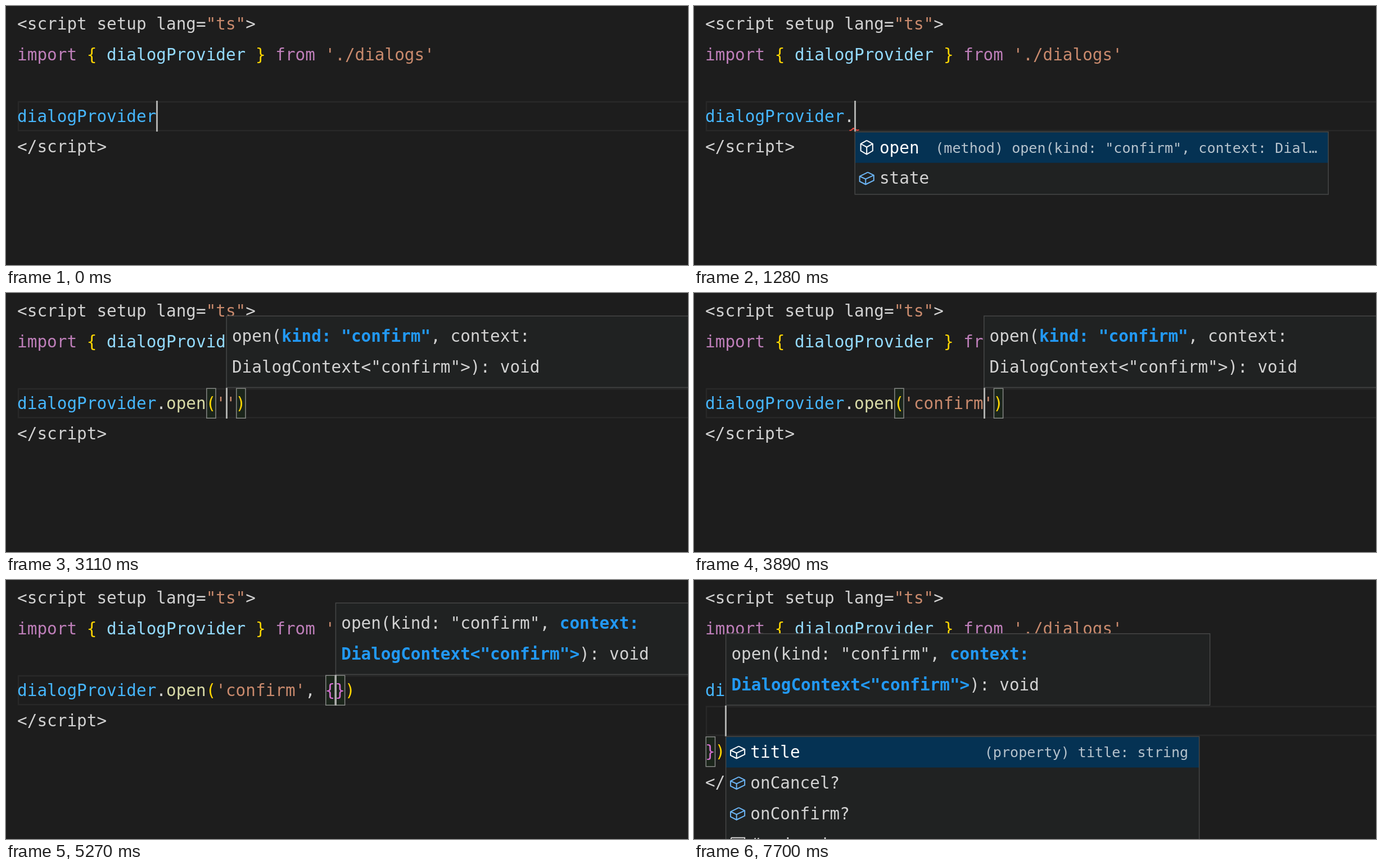
Write an HTML page with a canvas that moves like this. It is 1213 by 462 pixels and loops after 8000 ms.

```html
<!DOCTYPE html>
<html lang="en">
<head>
<meta charset="utf-8">
<title>Typed dialogs in an editor</title>
<style>
  html, body { margin: 0; width: 100%; height: 100%; overflow: hidden; background: #1d1d1d; }
  canvas { display: block; }
</style>
</head>
<body>
<canvas id="stage" width="1213" height="462"></canvas>
<script>
const ctx = document.getElementById('stage').getContext('2d');
const WIDTH = 1213, HEIGHT = 462, LOOP = 8000;
const LEFT = 20.1, ADVANCE = 17.66, FONT_SIZE = 29.33;
const FIRST_TOP = 5, LINE_HEIGHT = 54.75, BASELINE = 37.4;
const DETAIL_SCALE = 0.855;

const color = {
  back: '#1d1d1d', panel: '#202222', edge: '#464747', rule: '#282828',
  text: '#d2d2d2', keyword: '#bf7fba', string: '#c98a6d', gold: '#ffd602',
  pink: '#d670d3', name: '#94dbfe', constant: '#46b7ff', method: '#d9dba8',
  active: '#2299f5', blame: '#454545', caret: '#aeafad', error: '#e8483f',
  wordRead: '#474747', wordWrite: '#063654', selected: '#053253',
  field: '#6cb5f5', methodIcon: '#b180d7', white: '#ffffff'
};

const colX = col => LEFT + col * ADVANCE;
const lineTop = row => FIRST_TOP + row * LINE_HEIGHT;

// Code pieces
const OBJECT = ['dialogProvider', color.constant];
const DOT = ['.', color.text];
const OPEN = ['open', color.method];
const END = [['<\/script>', color.text]];
const paren = (...inner) => [OBJECT, DOT, OPEN, ['(', color.gold], ...inner, [')', color.gold]];
const quoted = word => [`'${word}'`, color.string];
const HEAD = [
  [['<' + 'script setup lang=', color.text], ['"ts"', color.string], ['>', color.text]],
  [['import ', color.keyword], ['{', color.gold], [' dialogProvider ', color.name],
   ['}', color.gold], [' from ', color.keyword], ["'./dialogs'", color.string]],
  []
];

const memberList = {
  col: 15, row: 4,
  items: [
    { label: 'open', icon: 'method', detail: '(method) open(kind: "confirm", context: Dial…' },
    { label: 'state', icon: 'field' }
  ]
};
const kindList = { col: 21, row: 4, items: [{ label: 'confirm', icon: 'box' }] };
const propertyList = detail => ({
  col: 2, row: 5,
  items: [
    { label: 'title', icon: 'field', detail },
    { label: 'onCancel?', icon: 'field' },
    { label: 'onConfirm?', icon: 'field' },
    { label: '#endregion', icon: 'box', detail: 'Folding Region End' }
  ]
});

// Each step overrides part of the state that came before it.
const steps = [
  [0, { code: [[OBJECT], END], col: 14, row: 3, caret: true, words: false, squiggle: 0,
        brackets: [], hint: null, list: null }],
  [120, { words: true }],
  [420, { caret: false }],
  [810, { caret: true }],
  [1130, { code: [[OBJECT, DOT], END], col: 15, words: false, list: memberList }],
  [1280, { squiggle: 15 }],
  [1530, { caret: false }],
  [2100, { code: [[OBJECT, DOT, ['open', color.name]], END], col: 19, caret: true,
           squiggle: 19, list: null }],
  [2340, { squiggle: 0 }],
  [2500, { code: [paren(), END], col: 20, brackets: [[19, 3], [20, 3]] }],
  [2670, { hint: { col: 20, row: 3, arg: 0 } }],
  [3040, { code: [paren(quoted('')), END], col: 21, brackets: [[19, 3], [22, 3]] }],
  [3110, { hint: { col: 21, row: 3, arg: 0 } }],
  [3190, { list: kindList }],
  [3640, { caret: false }],
  [3890, { code: [paren(quoted('confirm')), END], col: 28, caret: true, list: null,
           brackets: [[19, 3], [29, 3]], hint: { col: 28, row: 3, arg: 0 } }],
  [4300, { col: 29, hint: { col: 29, row: 3, arg: 0 } }],
  [4630, { code: [paren(quoted('confirm'), [',', color.text]), END], col: 30,
           brackets: [[19, 3], [30, 3]] }],
  [4710, { hint: { col: 30, row: 3, arg: 1 } }],
  [4870, { code: [paren(quoted('confirm'), [', ', color.text]), END], col: 31,
           brackets: [[19, 3], [31, 3]], hint: { col: 31, row: 3, arg: 1 } }],
  [5110, { code: [paren(quoted('confirm'), [', ', color.text], ['{}', color.pink]), END], col: 32,
           brackets: [[19, 3], [33, 3]], hint: { col: 32, row: 3, arg: 1 } }],
  [5270, { brackets: [[31, 3], [32, 3]] }],
  [5680, { code: [
             [...paren(quoted('confirm'), [', ', color.text]).slice(0, -1), ['{', color.pink]],
             [], [['}', color.pink], [')', color.gold]], END],
           col: 2, row: 4, brackets: [[31, 3], [0, 5]],
           hint: { col: 2, row: 4, arg: 1 } }],
  [6090, { caret: false }],
  [6660, { caret: true, list: propertyList('') }],
  [6740, { list: propertyList('(property) title: string') }],
  [7150, { caret: false }],
  [7700, { caret: true }]
];

function stateAt(time) {
  return Object.assign({}, ...steps.filter(([start]) => start <= time).map(([, change]) => change));
}

function fill(x, y, w, h, style) {
  ctx.fillStyle = style;
  ctx.fillRect(x, y, w, h);
}

function frame(x, y, w, h, style, width = 1.5) {
  ctx.strokeStyle = style;
  ctx.lineWidth = width;
  ctx.strokeRect(x, y, w, h);
}

function polyline(points, style, width) {
  ctx.beginPath();
  points.forEach(([x, y]) => ctx.lineTo(x, y));
  ctx.strokeStyle = style;
  ctx.lineWidth = width;
  ctx.stroke();
}

// Sets text on the monospace grid and returns the x after it.
function write(text, x, y, style, { bold = false, scale = 1 } = {}) {
  ctx.font = `${bold ? 'bold ' : ''}${FONT_SIZE * scale}px "DejaVu Sans Mono", monospace`;
  ctx.fillStyle = style;
  for (const char of text) {
    if (char !== ' ') ctx.fillText(char, x, y);
    x += ADVANCE * scale;
  }
  return x;
}

function drawLine(tokens, row) {
  let x = LEFT;
  for (const [text, style] of tokens) x = write(text, x, lineTop(row) + BASELINE, style);
}

function drawCurrentLine(row) {
  const top = lineTop(row);
  frame(22, top + 1.75, WIDTH, LINE_HEIGHT - 3.5, color.rule, 2.5);
}

function drawWords() {
  const width = 14 * ADVANCE;
  fill(178.5, 59, width, 55, color.wordWrite);
  fill(20.5, 169, width, 55, color.wordRead);
  write('You, 10 seconds ago • Uncommitted changes', colX(20), lineTop(3) + BASELINE, color.blame);
}

function drawBracket([col, row]) {
  const x = colX(col) + 1.2, y = lineTop(row) + 1;
  fill(x, y, 16.2, 53, '#1b251b');
  frame(x, y, 16.2, 53, '#868886');
}

function drawSquiggle(col) {
  const x = colX(col);
  polyline([[x - 8.5, 222], [x - 5.5, 221.5], [x - 1.5, 218], [x + 5, 221.8], [x + 8.5, 221]],
    color.error, 2);
}

function drawHint({ col, row, arg }) {
  const x = colX(col) + 1.2, bottom = lineTop(row) - 0.75, top = bottom - 127.5;
  fill(x, top, 861, 127.5, color.panel);
  frame(x, top, 861, 127.5, color.edge);
  const styleOf = index => index === arg ? color.active : color.text;
  const textX = x + 9.8, first = top + 46.3, second = first + LINE_HEIGHT;
  let end = write('open(', textX, first, color.text);
  end = write('kind: "confirm"', end, first, styleOf(0), { bold: arg === 0 });
  end = write(', ', end, first, color.text);
  write('context:', end, first, styleOf(1), { bold: arg === 1 });
  end = write('DialogContext<"confirm">', textX, second, styleOf(1), { bold: arg === 1 });
  write('): void', end, second, color.text);
}

const icons = {
  field: [
    [[9, 2.5], [14.5, 5.2], [14.5, 10], [7, 13.7], [1.5, 10.9], [1.5, 6.2], [9, 2.5]],
    [[1.5, 6.2], [7, 8.7], [14.5, 5.2]],
    [[7, 8.7], [7, 13.7]]
  ],
  method: [
    [[8, 1.5], [13.5, 4.5], [13.5, 11], [8, 14.3], [2.5, 11], [2.5, 4.5], [8, 1.5]],
    [[2.5, 4.5], [8, 7.6], [13.5, 4.5]],
    [[8, 7.6], [8, 14.3]]
  ],
  box: [
    [[2, 1.9], [14.5, 1.9], [14.5, 14], [2, 14], [2, 1.9]],
    [[5, 6], [11.5, 6]],
    [[5, 10], [11.5, 10]]
  ]
};
const iconColor = { field: color.field, method: color.methodIcon, box: color.text };

function drawIcon(name, centerX, centerY, style) {
  const scale = 1.93;
  for (const path of icons[name]) {
    polyline(path.map(([x, y]) => [centerX + (x - 8) * scale, centerY + (y - 8.1) * scale]), style, 2);
  }
}

function drawList({ col, row, items }) {
  const x = colX(col) + 1.2, top = lineTop(row) + 0.5, width = 842;
  const height = items.length * LINE_HEIGHT + 2;
  fill(x, top, width, height, color.panel);
  items.forEach(({ label, icon, detail = '' }, index) => {
    const y = top + 1 + index * LINE_HEIGHT, chosen = index === 0;
    if (chosen) fill(x, y, width, LINE_HEIGHT - 0.5, color.selected);
    drawIcon(icon, x + 21, y + 27.2, chosen ? color.white : iconColor[icon]);
    write(label, x + 43.7, y + BASELINE - 0.2, chosen ? color.white : color.text);
    const start = x + 822.5 - detail.length * ADVANCE * DETAIL_SCALE;
    write(detail, start, y + 36, chosen ? '#b6c3cd' : '#a9aaaa', { scale: DETAIL_SCALE });
  });
  frame(x, top, width, height, color.edge);
}

function draw(time) {
  const state = stateAt(time);
  fill(0, 0, WIDTH, HEIGHT, color.back);
  drawCurrentLine(state.row);
  if (state.words) drawWords();
  state.brackets.forEach(drawBracket);
  [...HEAD, ...state.code].forEach(drawLine);
  if (state.squiggle) drawSquiggle(state.squiggle);
  if (state.caret) {
    fill(Math.round(colX(state.col)), Math.round(lineTop(state.row)), 3, 55, color.caret);
  }
  if (state.hint) drawHint(state.hint);
  if (state.list) drawList(state.list);
}

function tick() {
  draw(performance.now() % LOOP);
  requestAnimationFrame(tick);
}
tick();
</script>
</body>
</html>
```
